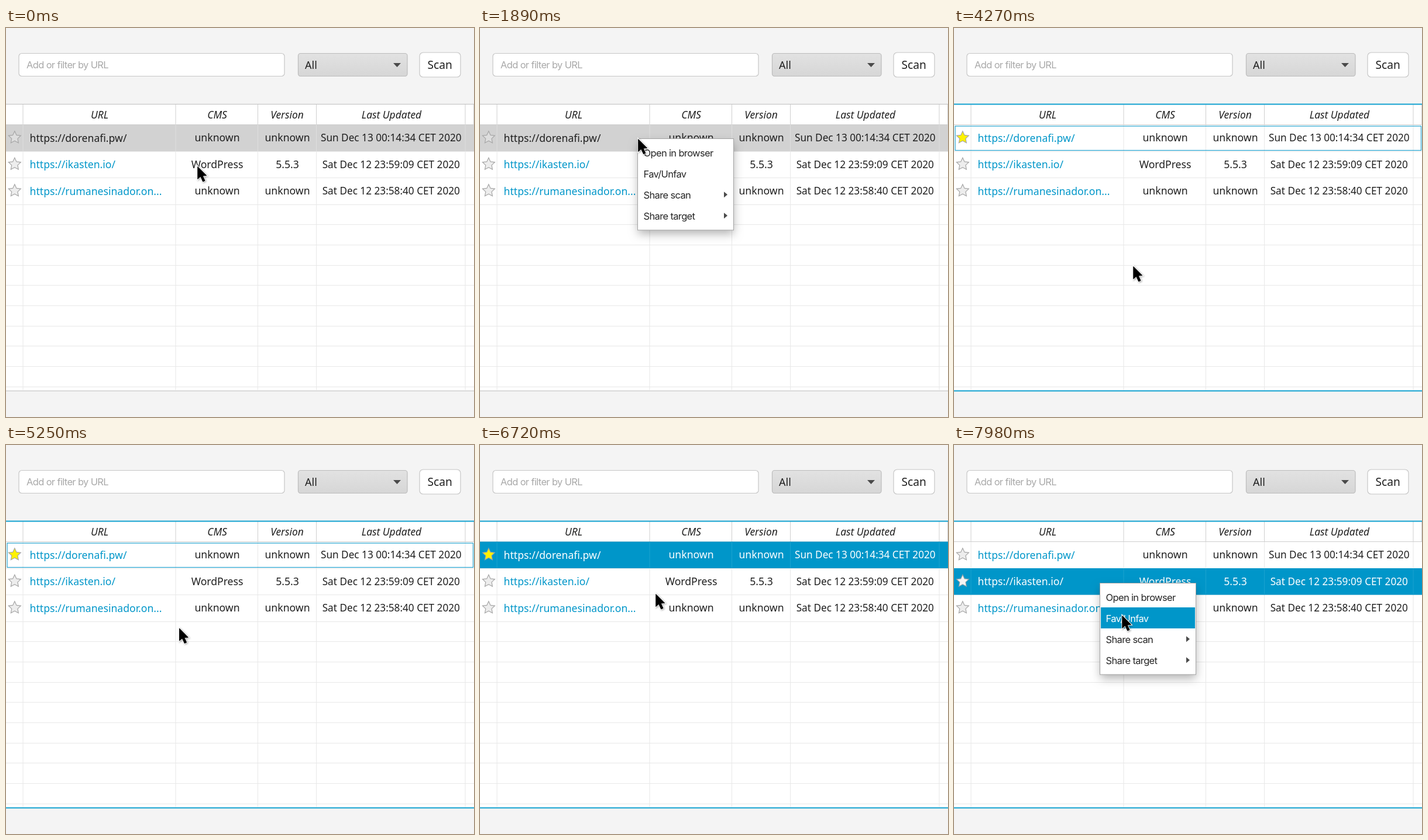
Animation of 800x666 px, one loop 8 s. Source, as an HTML page with a canvas:

```html
<!DOCTYPE html>
<html lang="en">
<head>
<meta charset="utf-8">
<title>Site scanner</title>
<style>
  html, body { margin: 0; width: 100%; height: 100%; overflow: hidden; background: #f4f4f4; }
  canvas { display: block; width: 800px; height: 666px; }
</style>
</head>
<body>
<canvas id="stage" width="800" height="666"></canvas>
<script>
const ctx = document.getElementById('stage').getContext('2d');
const LOOP = 8000, STEP = 70;
const BLUE = '#0096c9', INK = '#1f1f1f';
const NOTO = '"Noto Sans", sans-serif', INTER = 'Inter, sans-serif';
const COLUMNS = [29, 290, 430.5, 530.5, 785];
const HEADERS = [['URL', 160], ['CMS', 361], ['Version', 480.5], ['Last Updated', 659]];
const ROW_TOP = 165.5, ROW_HEIGHT = 45.5;
const SITES = [
  ['https://dorenafi.pw/', 'unknown', 'unknown', 'Sun Dec 13 00:14:34 CET 2020'],
  ['https://ikasten.io/', 'WordPress', '5.5.3', 'Sat Dec 12 23:59:09 CET 2020'],
  ['https://rumanesinador.on...', 'unknown', 'unknown', 'Sat Dec 12 23:58:40 CET 2020']
];
const MENU_ITEMS = ['Open in browser', 'Fav/Unfav', 'Share scan', 'Share target'];
const MENU_W = 164, MENU_H = 156.5, ITEM_H = 36;
const MENUS = [
  { from: 1820, to: 3500, x: 269.5, y: 189.5 },
  { from: 5810, to: 6650, x: 272.5, y: 198.5 },
  { from: 7630, to: LOOP, x: 249.5, y: 236.5 }
];
// Pointer stops: time, x, y
const POINTER = [
  [0, 327, 237], [840, 327, 238], [1260, 318, 340], [1750, 270, 190], [2520, 269, 189],
  [2940, 269, 189], [3360, 297, 250], [3500, 297, 250], [3780, 300, 300], [4270, 306, 408],
  [4480, 307, 413], [4760, 307, 413], [5110, 300, 335], [5670, 272, 198], [5900, 272, 198],
  [6370, 300, 255], [6860, 300, 255], [7490, 249, 236], [7640, 249, 236], [7910, 287, 292], [8000, 287, 292]
];

const between = (t, a, b) => t >= a && t < b;

function pointerAt(t) {
  const i = Math.max(1, POINTER.findIndex(p => p[0] >= t));
  const [t0, x0, y0] = POINTER[i - 1], [t1, x1, y1] = POINTER[i];
  const u = (t - t0) / (t1 - t0), k = u * u * (3 - 2 * u);
  return [x0 + (x1 - x0) * k, y0 + (y1 - y0) * k];
}

function stateAt(t) {
  const rowOneSelected = t < 3570 || between(t, 5740, 6790);
  return {
    focused: t >= 1960,
    selected: rowOneSelected ? 0 : t >= 7560 ? 1 : -1,
    outlined: between(t, 3570, 5740) || between(t, 6790, 7560),
    favourite: between(t, 3570, 6790),
    menu: MENUS.find(m => between(t, m.from, m.to)),
    pointer: pointerAt(t)
  };
}

function text(str, x, y, font, color, align = 'left', spacing = 0) {
  ctx.font = font;
  ctx.fillStyle = color;
  ctx.textAlign = align;
  ctx.letterSpacing = spacing + 'px';
  ctx.fillText(str, x, y);
}

function fill(x, y, w, h, color) {
  ctx.fillStyle = color;
  ctx.fillRect(x, y, w, h);
}

function box(x, y, w, h, r, paint, border) {
  ctx.beginPath();
  ctx.roundRect(x, y, w, h, r);
  ctx.fillStyle = paint;
  ctx.fill();
  ctx.lineWidth = 1.2;
  ctx.strokeStyle = border;
  ctx.stroke();
}

function polygon(points, color, border, width = 1) {
  ctx.beginPath();
  points.forEach(([x, y]) => ctx.lineTo(x, y));
  ctx.closePath();
  if (border) {
    ctx.lineWidth = width;
    ctx.strokeStyle = border;
    ctx.stroke();
  }
  ctx.fillStyle = color;
  ctx.fill();
}

function star(cx, cy, color, border) {
  const points = Array.from({ length: 10 }, (_, i) => {
    const r = i % 2 ? 4.7 : 9.6, a = Math.PI * (i / 5 - 0.5);
    return [cx + r * Math.cos(a), cy + r * Math.sin(a)];
  });
  polygon(points, color, border, 2.4);
}

function toolbar() {
  box(22, 43.5, 454, 39, 5, '#fff', '#c6c6c6');
  text('Add or filter by URL', 35, 69, '16.5px ' + INTER, '#a9a9a9', 'left', -0.65);
  const shade = ctx.createLinearGradient(0, 43, 0, 83);
  shade.addColorStop(0, '#e2e2e2');
  shade.addColorStop(1, '#d6d6d6');
  box(499.5, 43.5, 186.5, 39, 4, shade, '#bcbcbc');
  text('All', 511, 69.5, '18px ' + NOTO, INK);
  polygon([[662, 60], [675, 60], [668.5, 67]], '#4a4a4a');
  box(707, 42, 70, 42, 6, '#fff', '#c6c6c6');
  text('Scan', 741.7, 69.5, '19.2px ' + NOTO, INK, 'center');
}

function siteRow(site, i, s) {
  const top = ROW_TOP + i * ROW_HEIGHT, base = top + 28.5;
  const selected = s.selected === i, blue = selected && s.focused;
  if (selected) {
    fill(0, top, 800, ROW_HEIGHT, blue ? BLUE : '#d2d2d2');
    COLUMNS.forEach(x => fill(x - 0.5, top, 1, ROW_HEIGHT, blue ? '#1ba2d0' : '#dedede'));
  }
  if (i === 0 && s.outlined) {
    ctx.lineWidth = 1.2;
    ctx.strokeStyle = '#23a3cf';
    ctx.strokeRect(2, top + 2.5, 796.5, 41.5);
  }
  const favourite = i === 0 && s.favourite;
  star(14.8, top + 22.2, favourite ? '#fff200' : blue ? '#f4f4f4' : selected ? '#dedede' : '#ededed',
    blue ? '#8fa3aa' : '#a6a6a6');
  const color = blue ? '#fff' : INK;
  text(site[0], 40.6, base + 0.8, '17.6px ' + NOTO, selected ? color : BLUE);
  text(site[1], 361, base, '17.6px ' + NOTO, color, 'center');
  text(site[2], 481, base, '17.6px ' + NOTO, color, 'center');
  text(site[3], 658.3, base, '17.2px ' + NOTO, color, 'center');
}

function table(s) {
  fill(0, 130, 800, 491, '#fff');
  COLUMNS.forEach(x => {
    fill(x - 0.5, 166, 1, 454, '#e8e8e8');
    fill(x - 0.5, 131, 1, 34, '#cfcfcf');
  });
  fill(799, 131, 1, 34, '#cfcfcf');
  fill(0, 165, 800, 1, '#cfcfcf');
  for (let i = 1; i < 4; i++) fill(0, Math.floor(ROW_TOP + i * ROW_HEIGHT), 800, 1, '#e8e8e8');
  for (let i = 1; i < 10; i++) fill(0, Math.round(301.5 + i * 34.7), 800, 1, '#e8e8e8');
  HEADERS.forEach(([label, x]) => text(label, x, 155, 'italic 17.4px ' + NOTO, INK, 'center'));
  SITES.forEach((site, i) => siteRow(site, i, s));
  const edge = s.focused ? '#13a2d0' : '#c6c6c6', width = s.focused ? 2 : 1.2;
  fill(0, 130.5 - width / 2, 800, width, edge);
  fill(0, 621.3 - width / 2, 800, width, edge);
}

function contextMenu({ x, y }, [px, py]) {
  ctx.save();
  ctx.shadowColor = 'rgba(0,0,0,.3)';
  ctx.shadowBlur = 15;
  ctx.shadowOffsetY = 7;
  fill(x, y, MENU_W, MENU_H, '#fff');
  ctx.restore();
  ctx.lineWidth = 1;
  ctx.strokeStyle = '#a3a3a3';
  ctx.strokeRect(x, y, MENU_W, MENU_H);
  const hovered = px > x + 2 ? Math.floor((py - y - 6) / ITEM_H) : -1;
  MENU_ITEMS.forEach((label, i) => {
    const top = y + 6 + i * ITEM_H, active = i === hovered;
    if (active) fill(x + 1.5, top - 0.5, MENU_W - 3, ITEM_H, BLUE);
    text(label, x + 10, top + 24, '16.5px ' + INTER, active ? '#fff' : '#262626', 'left', -0.65);
    if (i > 1) {
      const mid = top + 17.7;
      polygon([[x + 147.5, mid - 5], [x + 153.5, mid], [x + 147.5, mid + 5]], active ? '#fff' : '#4a4a4a');
    }
  });
}

function arrowPointer([x, y]) {
  ctx.save();
  ctx.translate(x + 0.5, y);
  ctx.shadowColor = 'rgba(0,0,0,.25)';
  ctx.shadowBlur = 3;
  ctx.shadowOffsetX = ctx.shadowOffsetY = 1;
  const shape = [[0, 0], [0, 22], [5, 17.6], [9, 26.2], [12.8, 24.5], [9, 16.3], [15.6, 15.8]];
  polygon(shape, '#000', '#fff', 2.4);
  ctx.shadowColor = 'transparent';
  polygon(shape, '#000');
  ctx.restore();
}

function draw(now) {
  const t = Math.floor((now % LOOP) / STEP) * STEP;
  const s = stateAt(t);
  fill(0, 0, 800, 666, '#f4f4f4');
  toolbar();
  table(s);
  if (s.menu) contextMenu(s.menu, s.pointer);
  arrowPointer(s.pointer);
  requestAnimationFrame(tick);
}

let start;
function tick(now) {
  start ??= now;
  draw(now - start);
}
requestAnimationFrame(tick);
</script>
</body>
</html>
```
